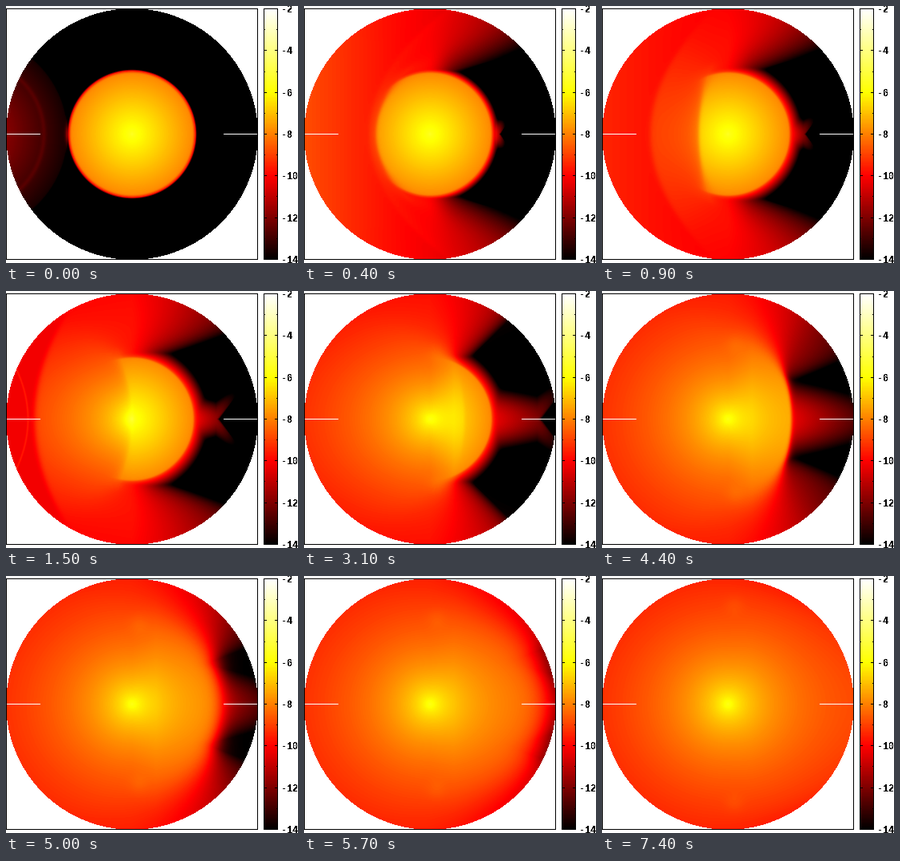
Write a matplotlib script that moves like this. It is 365 px wide and 322 px high and loops after 7500 ms.

```python
import numpy as np
import matplotlib.pyplot as plt
from matplotlib.animation import FuncAnimation
from matplotlib.colors import LinearSegmentedColormap
from matplotlib.patches import Rectangle

W, H, DPI = 365, 322, 100
FRAMES, STEP = 75, 100
CX, CY, RADIUS, STAR = 157, 160, 157.3, 79
LOW, HIGH, EMPTY = -14, -2, -17

cmap = LinearSegmentedColormap.from_list(
    "heat", [(0, "black"), (1 / 3, "red"), (2 / 3, "yellow"), (1, "white")])
cmap.set_bad("white")

col, row = np.meshgrid(np.arange(315), np.arange(H))
X = (col - CX).astype(float)
Y = np.abs(row - CY).astype(float)
R = np.hypot(X, Y)
SIDE = (X / np.maximum(R, 1)) ** 2
BLAST = np.hypot(col + 47, Y)          # distance from the explosion
blank = (R > RADIUS) | ((row == CY) & ((col < 43) | (col >= 272)))


def ramp(t, start, end, a, b):
    return a + (b - a) * np.clip((t - start) / (end - start), 0, 1)


def step(z):
    return 0.5 * (1 + np.tanh(z / 2))


def bell(z):
    return np.exp(-z**2)


def mix(a, b, w):
    return a + (b - a) * w


def add_logs(*layers):
    return np.log10(sum(10.0 ** layer for layer in layers))


def shock_front(t):
    axis = np.interp(t, [0, 0.4, 1.5, 3.1, 4.4, 5.7, 7],
                     [-82, -67, 1, 43, 79, 150, 240])
    return axis + ramp(t, 0.4, 1.5, 0.006, -0.0025) * Y**2


def ejecta(t, reach):
    """Incoming blast wave, left of the bow shock."""
    d = BLAST * 125 / reach
    shells = -11.9 - 0.023 * (d - 47) + 0.35 * bell((d - 94) / 3)
    level = ramp(t, 0, 0.4, -11.5, -8.8) + ramp(t, 0.4, 1.5, 0, -1.4)
    flow = mix(shells, level - ramp(t, 0.4, 1.5, 0.0095, 0) * col,
               ramp(t, 0, 0.3, 0, 1))
    arc = -55 - 50 * t - 0.0037 * Y**2
    return flow + ramp(t, 0.9, 1.5, 0, 0.6) * bell((X - arc) / 1.3)


def envelope(t, flow, front, bow):
    """Gas already passed by the shock."""
    depth = np.maximum(front - X, 0)
    gas = -5.7 - 1.62 * np.log(1 + R / 20)
    gas -= ramp(t, 1.5, 4.4, 0.6, 0.1) * (1 - SIDE) * R / 100
    gas += np.clip(X / 30, 0, 1) * np.exp(-depth / 90) * bell(Y / 110)
    gas += 0.2 * bell(np.hypot(X - 8, Y - 50 - 10 * t) / 12)
    squeezed = flow + 0.25 * np.exp(-np.maximum(X - bow, 0) / 30)
    gas = mix(squeezed, gas, ramp(t, 0.4, 1.3, 0, 1))
    glow = ramp(t, 1.5, 3.1, 0.7, 0)
    return gas + glow * np.exp(-depth / 8) * step((88 - R) / 3)


def star(t):
    inner = -5.75 - 0.0275 * R + 0.3 * np.exp(-R / 3) - 1.6 * step((R - 77.5) / 0.7)
    fade = 0.28 + 1.8 * np.exp(-4 * t)
    return np.where(R < STAR, inner, -9.4 - (R - STAR) * fade)


def wake(t):
    """Flow passing around the star, with a shadow behind it."""
    tilt = 0.25 + 0.65 * bell((t - 3.1) / 0.8)
    above = Y - ramp(t, 3.1, 4.4, 88, 42) - tilt * (X - 60)
    shade = 2.5 * np.exp(-np.maximum(above, 0) / ramp(t, 0.4, 1.5, 22, 12))
    shade += np.maximum(-above, 0) / ramp(t, 3.1, 4.4, 4, 9)
    base = ramp(t, 0, 0.4, -12, -9.8)
    return base - 0.02 * np.maximum(X, 0) - shade * step((X - 15) / 8)


def stream(t):
    """Gas closing in on the axis behind the star, forked at its tip."""
    fork = 1.2 * np.maximum(0, X - 78 - 18 * t)
    fall = 0.03 + 0.6 * np.exp(-2 * t)
    width = (9 + 3.7 * t) * np.where(Y < fork, 0.25, 1)
    return (-10.4 - fall * np.maximum(X - 83, 0) - 0.03 * fork
            - ((Y - fork) / width) ** 2)


def field(t):
    reach = 125 + 940 * t
    front = shock_front(t)
    bow = -60 - 41 * t + ramp(t, 0.4, 1.5, 0.004, 0.0023) * Y**2
    blur = ramp(t, 4.4, 5.7, 1.2, 12) + 8 * (Y / 90) ** 4
    swept = step((reach - BLAST) / 0.7)

    def arrived(layer):
        return mix(EMPTY, np.maximum(layer, EMPTY), swept)

    flow = ejecta(t, reach)
    left = mix(flow, envelope(t, flow, front, bow), step((X - bow) / 2))
    right = add_logs(star(t), arrived(wake(t)), arrived(stream(t)))
    value = mix(np.maximum(right, LOW), np.maximum(arrived(left), LOW),
                step((front - X) / blur))
    return np.ma.array(value, mask=blank)


fig = plt.figure(figsize=(W / DPI, H / DPI), dpi=DPI, facecolor="white")
ax = fig.add_axes([0, 0, 1, 1])
ax.axis("off")
scale = dict(cmap=cmap, vmin=LOW, vmax=HIGH, interpolation="nearest", aspect="auto")
picture = ax.imshow(field(0), extent=(-0.5, 314.5, H - 0.5, -0.5), **scale)
ax.imshow(np.linspace(HIGH, LOW, 315)[:, None],
          extent=(321.5, 339.5, 317.5, 2.5), **scale)
ax.set_xlim(-0.5, W - 0.5)
ax.set_ylim(H - 0.5, -0.5)


def bar(x, y, w, h):
    ax.add_patch(Rectangle((x - 0.5, y - 0.5), w, h, fc="black", lw=0,
                           antialiased=False, zorder=3))


def frame(x, y, w, h):
    bar(x, y, w, 1)
    bar(x, y + h - 1, w, 1)
    bar(x, y, 1, h)
    bar(x + w - 1, y, 1, h)


frame(0, 3, 315, 315)
frame(322, 3, 18, 315)
for value in range(LOW, HIGH + 1):
    y = round(3 + (HIGH - value) * 314 / 12)
    major = value % 2 == 0
    size = 4 if major else 2
    bar(340 - size, y, size, 1)
    bar(322, y, size, 1)
    if major:
        ax.text(343.5, y + 4.5, str(value), family="Liberation Mono", weight="bold",
                size=8.4, va="baseline", ha="left", antialiased=False)


def update(i):
    picture.set_data(field(i * STEP / 1000))
    return [picture]


anim = FuncAnimation(fig, update, frames=FRAMES, interval=STEP,
                     repeat=True, repeat_delay=0)
plt.show()
```
